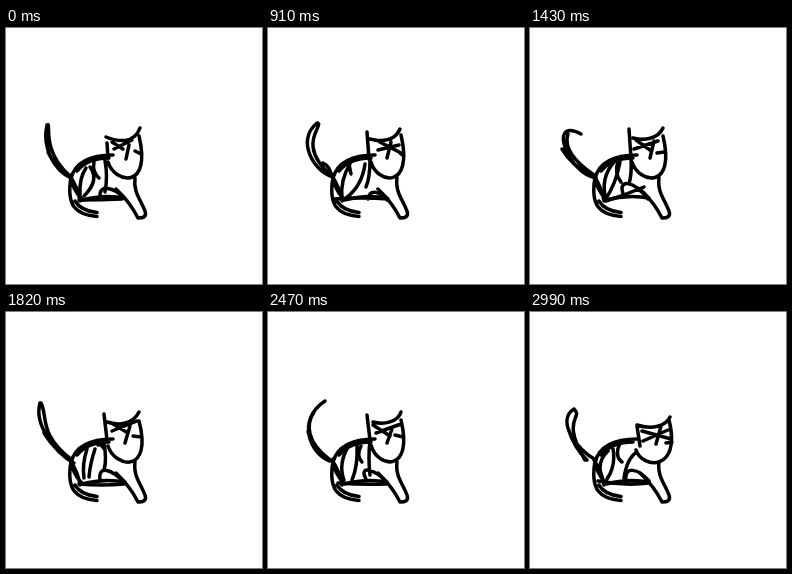
Write an HTML page that moves like this. It is 256 by 256 pixels and loops after 3.12 s.

```html
<!DOCTYPE html>
<html>
<head>
<meta charset="utf-8">
<style>
  html, body { margin: 0; height: 100%; overflow: hidden; background: #fff; }
  svg { display: block; width: 100%; height: 100%; }
  path { fill: none; stroke: #000; stroke-width: 3.5; stroke-linecap: round; stroke-linejoin: round; }
</style>
</head>
<body>
<svg viewBox="0 0 256 256">
  <!-- back, haunch, hind foot, belly and front leg -->
  <path d="M65 150C69 136 82 127 107 127M71 143Q82 130 103 130M65 147Q66 162 76 171M64 148Q72 160 74 173
    M65 149C60 178 70 187 91 188.500M69 173Q75 183 91 184.500M76 172Q98 166 119 170
    M129 150C127 164 135 172 139 183C141 189 137 190 132 190Q124 174 110 161"/>
  <path id="body"/>
  <path id="tail"/>
</svg>
<script>
// Order: ears, cheek, eyes, nose, whisker, head, chest, three stripes, belly, knee
const bodies = {
  sit: `M100 109C112 114 128 116 134 100M101 115L102 130M106 114L117 121M108 121L126 112M123 117L120 131M129 123L135 126
    M102 134C109 156 146 162 133 108M99 133Q102 148 99 164
    M80 140Q73 150 74 167M84 139Q94 152 78 168M88 134Q86 144 93 150M73 172Q95 172 116 171M94 167C94 156 108 160 117 169`,
  squint: `M100 111C112 114 126 112 131 101M100 114L102 126M106 113L132 121M107 123L134 118M124 112L119 130M128 127L134 126
    M102 134C109 156 148 162 133 104M101 131Q102 148 101 164
    M81 138Q72 154 74 172M86 134Q89 156 84 172M86 134Q87 146 93 151M70 173Q95 173 112 171M98 168C88 150 104 152 117 168`,
  alert: `M102 111C114 114 127 113 132 101M99 104L101 131M108 112L133 125M110 122L131 117M123 114L119 130M132 125L136 128
    M103 134C109 156 146 162 133 107M102 131Q102 150 98 159
    M82 136Q72 152 74 171M97 136Q94 158 78 170M80 133Q82 140 83 146M66 171Q95 169 120 171M100 171C102 160 112 164 119 172`,
  crouch: `M103 110C114 113 128 111 133 100M99 101L101 130M106 112L120 122M104 121L128 113M124 113L120 130M127 125L134 124
    M102 134C109 156 146 162 133 108M101 130Q102 146 99 156
    M84 134Q70 150 76 172M90 134Q86 156 75 172M88 133Q84 146 91 154M76 173Q95 167 114 159M94 168C86 150 104 152 118 171`,
  rest: `M101 110C113 114 127 112 133 100M98 102L101 128M107 112L122 121M106 119L131 109M124 114L119 131M127 124L135 125
    M102 134C109 156 147 162 133 109M98 131Q101 148 98 158
    M81 137Q76 152 78 166M89 137Q84 152 83 165M92 133Q94 130 99 138M73 172Q95 174 118 172M94 168C92 152 106 158 118 170`,
  look: `M105 110C116 113 130 110 133 100M99 103L102 128M105 113L122 124M108 121L133 112M124 117L119 131M127 123L135 125
    M103 133C109 156 146 162 133 108M102 128Q100 146 102 163
    M80 135Q70 152 76 168M89 133Q90 154 84 168M93 134Q88 144 94 150M70 171Q95 173 118 172M98 167C90 152 108 158 118 170`,
  lean: `M107 113C122 118 136 114 140 105M107 114L110 134M112 119L141 127M113 129L138 118M131 114L126 132M136 131L142 130
    M106 138C112 157 152 160 139 108M107 140Q97 146 94 166
    M78 139Q66 150 72 166M83 137Q86 154 77 167M90 131Q84 144 92 150M68 169Q95 174 119 171M96 168C94 154 108 156 119 169`
};

// Order: outer edge, inner edge, shading stroke
const tails = {
  up: "M65 150C47 142 36 118 41 97M41 97C46 93 34 122 64 148M42 124Q48 138 62 146",
  hook: "M65 149C44 140 22 116 36 105M36 105C32 118 42 132 65 146M36 105Q39 108 38 111",
  right: "M65 149C45 143 28 112 49 95M49 95C58 96 26 116 64 148M55 135Q62 138 64 149",
  curl: "M66 150C38 146 17 88 51 106M38 106C34 118 42 132 64 147M32 121Q42 138 62 148",
  thin: "M68 151C48 140 28 112 34 91M35 91C42 104 32 122 66 148M38 121Q48 137 62 146",
  high: "M66 149C42 138 30 106 50 83M50 83C48 100 34 120 64 148M40 120Q48 136 62 146",
  sweep: "M62 149C42 142 28 108 57 89M46 100C38 112 38 130 62 148M40 120Q46 138 58 146",
  bent: "M66 148C46 138 26 108 44 97M44 97C54 106 30 106 55 148M38 116Q44 136 57 148",
  left: "M66 149C50 138 22 132 16 108M16 108C26 104 24 126 64 147M40 132Q50 142 62 146"
};

const STEP = 130, COUNT = 24;
const keys = [
  [0, "sit", "up"], [3, "squint", "hook"], [4, "lean", "left"], [7, "alert", "right"],
  [9, "lean", "left"], [11, "crouch", "curl"], [13, "lean", "left"], [14, "rest", "thin"],
  [15, "rest", "high"], [17, "lean", "left"], [19, "look", "sweep"], [23, "lean", "bent"],
  [COUNT, "sit", "up"]
];

function blend(a, b, t) {
  const ends = b.match(/\d+/g);
  let i = 0;
  return a.replace(/\d+/g, n => +n + (ends[i++] - n) * t);
}

const bodyPath = document.getElementById("body");
const tailPath = document.getElementById("tail");

function draw() {
  const step = Math.floor(performance.now() / STEP) % COUNT;
  const next = keys.findIndex(key => key[0] > step);
  const [from, bodyA, tailA] = keys[next - 1];
  const [to, bodyB, tailB] = keys[next];
  const t = (step - from) / (to - from);
  bodyPath.setAttribute("d", blend(bodies[bodyA], bodies[bodyB], t));
  tailPath.setAttribute("d", blend(tails[tailA], tails[tailB], t));
  requestAnimationFrame(draw);
}
draw();
</script>
</body>
</html>
```
